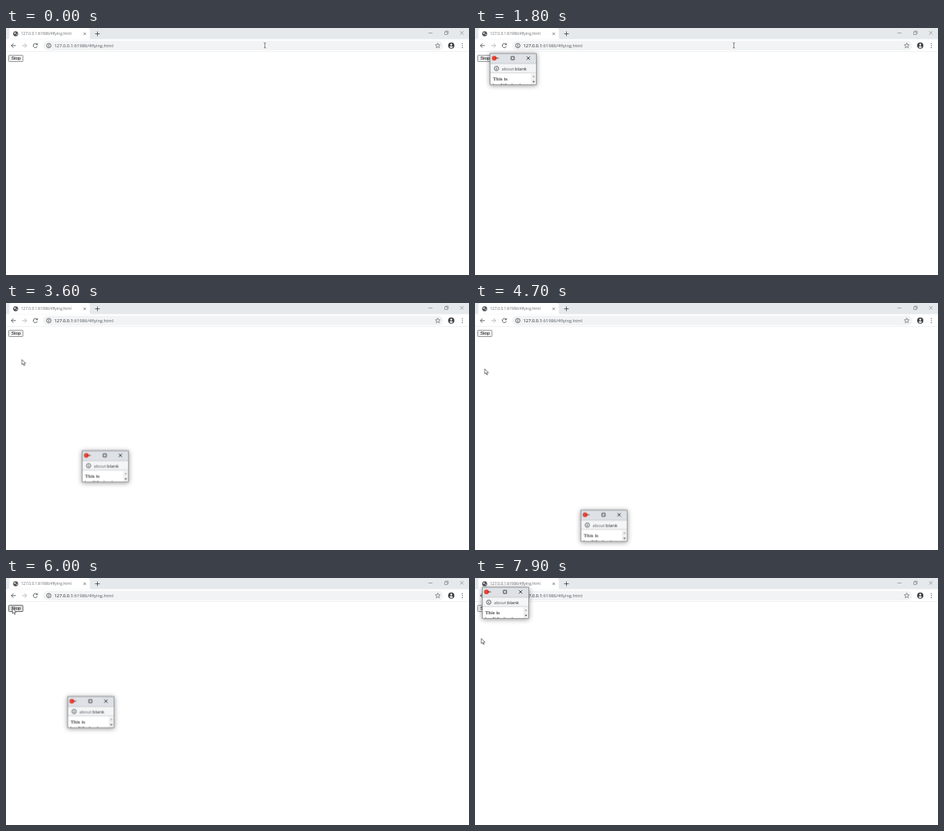
An HTML page that plays this animation: 600 by 320 pixels, repeating every 8000 ms.

```html
<!DOCTYPE html>
<html lang="en">
<head>
<meta charset="utf-8">
<title>Flying window</title>
<style>
  html, body { margin: 0; width: 100%; height: 100%; overflow: hidden; background: #fff; }
  svg { display: block; width: 600px; height: 320px; }
  text { font-family: "Open Sans", "Noto Sans", sans-serif; font-size: 5.8px; white-space: pre; }
  .line { fill: none; stroke: currentColor; stroke-width: var(--w, .8); }
  .thin { --w: .55; }
  .dark { color: #3c4043; }
  .pale { color: #a9acb0; }
  .soft { fill: #575b60; }
  #chrome { color: #686b70; }
  #chrome text { font-size: 4.95px; fill: currentColor; }
  #host { fill: #202124; }
  #button { fill: #efefef; stroke: #808080; }
  #button + text { font-family: "Liberation Sans", Arial, sans-serif; font-size: 5.85px; }
  #popup { filter: drop-shadow(.8px 1px 3px rgba(0, 0, 0, .42)); }
  #popup .page { font-family: "Liberation Serif", "Times New Roman", serif; font-size: 7.1px; }
  #focus, #popup, #arrow { opacity: 0; }
</style>
</head>
<body>
<svg viewBox="0 0 600 320">
  <defs>
    <clipPath id="view"><rect x="1" y="26" width="52.5" height="14.4"/></clipPath>
    <g id="info" class="line">
      <circle r="2.8"/>
      <path d="M0-.4V1.6M0-1.6V-.9"/>
    </g>
    <path id="cross" class="line" d="M-2.2-2.2 2.2 2.2M2.2-2.2-2.2 2.2"/>
  </defs>

  <!-- tab strip -->
  <rect width="600" height="14.5" fill="#e6e9ec"/>
  <path d="M2 14.5Q4.5 14.5 4.5 12V2.5Q4.5 0 7 0H106Q108.5 0 108.5 2.5V12Q108.5 14.5 111 14.5Z" fill="#fff"/>
  <circle cx="12.5" cy="7.5" r="3.2" fill="#4d5156"/>
  <path d="M10.3 6.2 12 5.5 12.7 7 11.5 8ZM13.2 8 15 7.4 14 9.6Z" fill="#fff"/>
  <g class="dark">
    <use href="#cross" transform="translate(102 7.5) scale(.75)"/>
    <path class="line" d="M115.5 7.5h6M118.5 4.5v6"/>
  </g>
  <g id="chrome" class="thin">
    <text x="19.5" y="9.3">127.0.0.1:61986/4flying.html</text>
    <path class="line" d="M547.5 6.5h5M568.5 5h3.5v3.5h-3.5zM569.5 5v-1h3.5v3.5h-1"/>
    <use href="#cross" x="590.7" y="6.3"/>
  </g>

  <!-- toolbar -->
  <path d="M0 30.5H600" stroke="#f0f1f3"/>
  <rect x="48" y="16.5" width="518.5" height="12.6" rx="6.3" fill="#f1f3f4"/>
  <g class="dark">
    <path class="line" d="M12.7 22.8H7M9.7 20 6.9 22.8 9.7 25.6"/>
    <path class="line" d="M40.3 21.3A2.7 2.7 0 1 0 40.6 23.6M40.8 19.6V21.7H38.7"/>
    <path class="line thin" d="M559.5 19.5 560.4 21.7 562.6 21.9 560.9 23.4 561.4 25.7 559.5 24.5 557.6 25.7 558.1 23.4 556.4 21.9 558.6 21.7Z"/>
    <circle cx="577" cy="22.7" r="4" fill="#3c4043"/>
    <circle cx="577" cy="21.5" r="1.2" fill="#fff"/>
    <path d="M574.6 24.8Q577 22.4 579.4 24.8Q577 26.6 574.6 24.8Z" fill="#fff"/>
    <path d="M591.3 20.2v6" stroke="#3c4043" stroke-width="1.2" stroke-linecap="round" stroke-dasharray="0 2.6"/>
    <use href="#info" x="55.5" y="22.8"/>
  </g>
  <path class="line pale" d="M21 22.8h5.7M24 20l2.8 2.8L24 25.6"/>
  <text x="62.5" y="24.9"><tspan id="host">127.0.0.1</tspan><tspan class="soft">:61986/4flying.html</tspan></text>
  <g id="focus">
    <rect x="48.5" y="16.9" width="517.5" height="12" rx="6" fill="none" stroke="#1a73e8"/>
    <rect x="62.3" y="18.7" width="77" height="8.3" fill="#0078d7"/>
    <text x="62.5" y="24.9" fill="#fff">127.0.0.1:61986/4flying.html</text>
  </g>

  <!-- page -->
  <rect id="button" x="3.5" y="35.3" width="18.5" height="8.2" rx=".8" stroke-width=".8"/>
  <text x="6.9" y="41.3">Stop</text>

  <g id="popup">
    <rect x=".5" y=".5" width="60" height="40.3" fill="#fff"/>
    <path d="M.5 .5h60v13h-60z" fill="#dee1e6"/>
    <path d="M.5 13.5h60v12h-60z" fill="#f4f5f6"/>
    <path d="M.5 13.5h60M.5 25.5h60" stroke="#bfc2c6" stroke-width=".7"/>
    <circle cx="5.8" cy="6.5" r="3.1" fill="#ea4335"/>
    <g color="#202124">
      <path class="line" d="M7 6.5h4.5M27.8 4.5h4v4h-4z"/>
      <use href="#cross" x="50" y="6.5"/>
    </g>
    <use href="#info" x="8.8" y="19.9" class="dark"/>
    <text x="15.5" y="22"><tspan class="soft">about:</tspan><tspan fill="#202124">blank</tspan></text>
    <g clip-path="url(#view)">
      <text class="page" x="4" y="35.9">This is</text>
      <text class="page" x="4" y="43.3">'myWindow'</text>
    </g>
    <path d="M53.5 26h6.7v14.5h-6.7z" fill="#f1f1f1"/>
    <path d="M55.3 31 57 29 58.7 31Z" fill="#a3a3a3"/>
    <path d="M55.3 36.3 57 38.3 58.7 36.3Z" fill="#505050"/>
    <rect x=".5" y=".5" width="60" height="40.3" fill="none" stroke="#808489" stroke-width=".8"/>
  </g>

  <path id="beam" class="line thin" color="#333" d="M334 19.3h1l.5.4.5-.4h1M335.5 19.7v5.7M334 25.8h1l.5-.4.5.4h1"/>
  <path id="arrow" d="M.3.3V7L1.9 5.6 3 8.2 4.1 7.7 3 5.2H5.2Z" fill="#fff" stroke="#222" stroke-width=".6"/>
</svg>

<script>
  const LOOP = 8000;
  const timing = { duration: LOOP, iterations: Infinity, easing: "steps(80)" };

  // Each step is [ms, value]; the last value holds until the loop ends.
  function track(id, prop, steps, easing = "linear") {
    const all = [...steps, [LOOP, steps[steps.length - 1][1]]];
    const frames = all.map(([ms, value]) => ({ offset: ms / LOOP, [prop]: value, easing }));
    document.getElementById(id).animate(frames, timing);
  }

  const hard = (id, prop, steps) => track(id, prop, steps, "step-end");

  const path = (id, points) =>
    track(id, "transform", points.map(([ms, x, y]) => [ms, `translate(${x}px, ${y}px)`]));

  const IDLE = "#686b70", ACTIVE = "#33363a";

  hard("host", "fill", [[0, "#4a4d51"], [50, "#202124"]]);
  track("chrome", "color", [[0, IDLE], [500, IDLE], [800, ACTIVE], [1300, ACTIVE], [1400, IDLE]]);
  hard("focus", "opacity", [[0, 0], [550, 1], [1350, 0]]);
  hard("button", "fill", [[0, "#efefef"], [5850, "#dcdcdc"], [6250, "#efefef"]]);
  hard("button", "stroke", [[0, "#808080"], [5850, "#4f4f4f"], [6250, "#808080"]]);

  hard("popup", "opacity", [[0, 0], [1450, 1]]);
  path("popup", [
    [0, 11, 16.5], [1618, 11, 16.5], [4587.5, 141.65, 277.8], [7751, 2.45, -1.6], [7999, 13.4, 20.2]
  ]);

  hard("beam", "opacity", [[0, 1], [1850, 0]]);
  hard("arrow", "opacity", [[0, 0], [1850, 1]]);
  path("arrow", [
    [0, 330, 22], [1900, 330, 22], [2200, 286, 9], [3100, 92, 47], [3600, 20.3, 73],
    [4000, 12.3, 85], [4900, 12.3, 85], [5400, 2, 1], [5900, 8, 39], [6200, 8, 39],
    [6600, 8.5, 78], [7600, 8.5, 78], [7700, 7.8, 78]
  ]);
</script>
</body>
</html>
```
